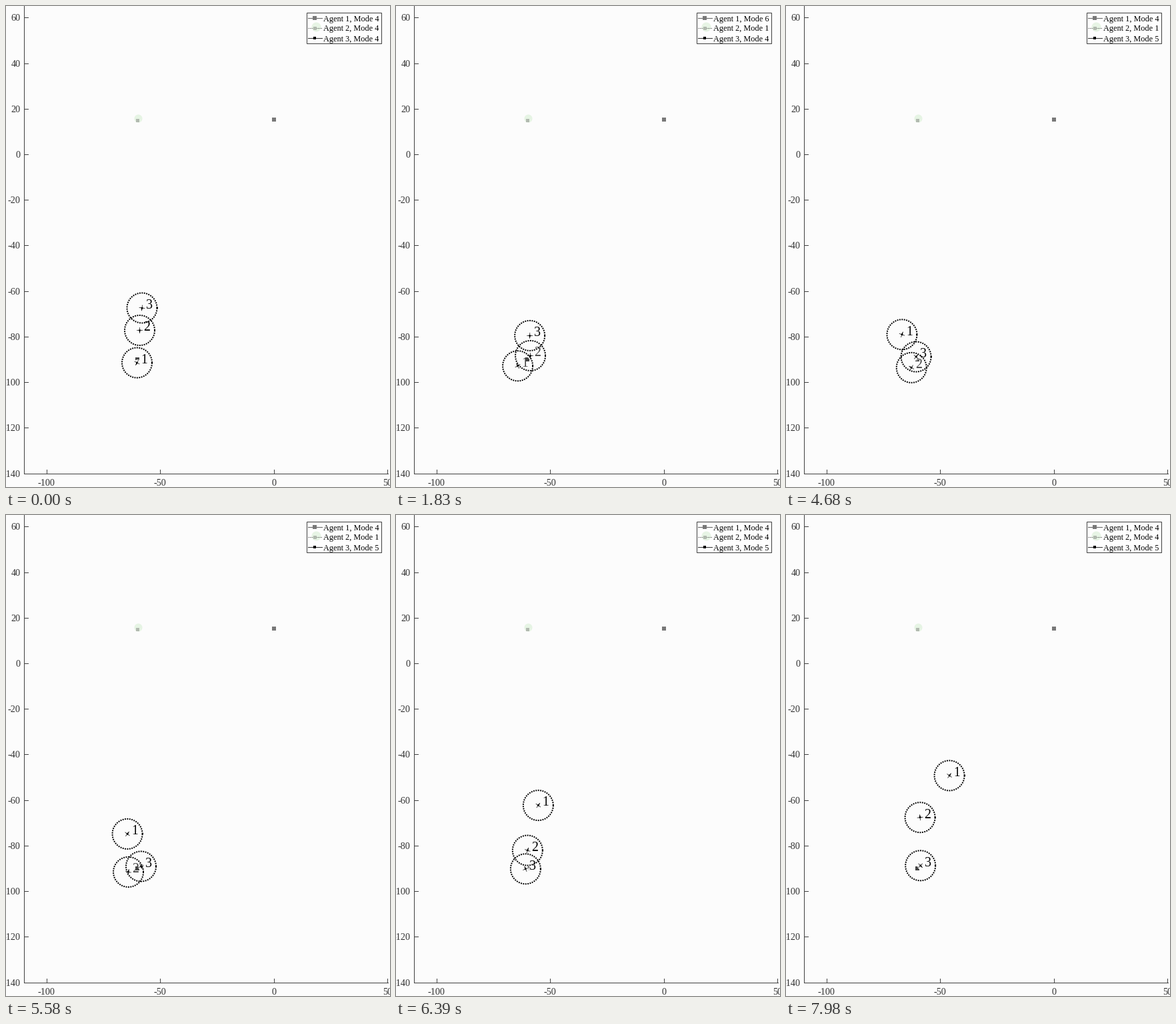
Animation, 576 px wide and 720 px high, one loop 8000 ms. Source, as a matplotlib script:

```python
import numpy as np
import matplotlib.pyplot as plt
from matplotlib.animation import FuncAnimation

W, H = 576, 720
LOOP, STEP = 8000, 20
SLOW, CUT = 2520, 5730      # slow stretch, then a hard jump in the flight
PAPER, DIM, INK, RULE = "#fcfcfc", "#f1f1f1", "#333333", "#404040"
RADIUS = 22.5

plt.rcParams["font.family"] = "Liberation Serif"


def hold(t):
    """Time of the pose on show: 60 ms steps, 180 ms in the slow stretch."""
    if t >= CUT:
        return max(CUT, t - t % 60)
    start, gap = (SLOW, 180) if t >= SLOW else (30, 60)
    return max(0, t - (t - start) % gap)


def curve(t, start, end, *points):
    """Point on the Bezier curve flown from start to end."""
    u = (t - start) / (end - start)
    pts = np.array(points, float)
    while len(pts) > 1:
        pts = pts[:-1] + (pts[1:] - pts[:-1]) * u
    return pts[0]


def orbit(degrees):
    a = np.radians(degrees)
    return np.array([198.5 + 4.5 * np.cos(a), 528 + 4.5 * np.sin(a)])


def first(t):
    if t < SLOW:
        return curve(t, 0, SLOW, (196.5, 534), (184.5, 556), (178.5, 525))
    if t < CUT:
        return curve(t, SLOW, CUT, (178.5, 525), (162.5, 501), (184, 475))
    return curve(t, CUT, LOOP, (201, 452), (245.5, 389.5))


def second(t):
    if t < SLOW:
        return curve(t, 0, SLOW, (200.5, 485.5), (202, 539.5))
    if t < CUT:
        return curve(t, SLOW, CUT, (202, 539.5), (211, 550), (179, 543), (184, 533))
    return curve(t, CUT, LOOP, (190.5, 516), (205.5, 493.5), (201, 452))


def third(t):
    if t < 3240:
        return curve(t, 0, 3240, (204, 452), (198.5, 488), (202, 531))
    if t < CUT:
        return orbit(41 + (t - 3240) / 8)
    return orbit(-45 + (t - CUT) * 0.32)


def modes(t):
    return (6 if 1200 <= t < 2700 else 4,
            1 if 1500 <= t < 6180 else 4,
            4 if t < 2700 else 5)


fig = plt.figure(figsize=(W / 72, H / 72), dpi=72, facecolor=PAPER)
ax = fig.add_axes([0, 0, 1, 1])
ax.set_xlim(0, W)
ax.set_ylim(H, 0)
ax.axis("off")


def line(xs, ys, color=RULE, lw=1, **kw):
    return ax.plot(xs, ys, color=color, lw=lw, **kw)[0]


def dot(x, y, marker, size, color, z=3):
    return line([x], [y], color, marker=marker, ms=size, mew=0, ls="", zorder=z)


def draw_axes():
    line([26.5, 26.5], [0, 699.5])
    line([26.5, 572.5], [699.5, 699.5])
    for v in range(-140, 61, 20):
        y = 222 - 3.411 * v
        line([26.5, 33], [y, y])
        ax.text(21.5, y + 5, str(v), size=14.2, color=INK, ha="right")
    for v in range(-100, 51, 50):
        x = 401.7 + 3.408 * v
        line([x, x], [694, 699.5])
        ax.text(x, 717.5, str(v), size=14.2, color=INK, ha="center")


def draw_legend():
    ax.add_patch(plt.Rectangle((450.5, 9.5), 112, 46, fc="#fefefe",
                               ec=RULE, lw=1, zorder=1))
    dot(465, 31, "o", 14, "#e7f4e5", 2)
    styles = [("#606060", "-", "#787878", 6),
              ("#505050", (0, (1.2, 1.2)), "#b2bab0", 5),
              ("#333333", "-", "black", 4.8)]
    rows = []
    for i, (color, ls, fill, size) in enumerate(styles):
        y = 18 + 15 * i
        line([453, 474], [y, y], color, ls=ls)
        dot(463, y - 0.4, "s", size, fill)
        rows.append(ax.text(476.3, y + 4.5, "", size=12.3, color="black"))
    return rows


draw_axes()
rows = draw_legend()

# Goals
halo = dot(198, 168, "o", 12, "#e6f4e4", 2)
dot(196.5, 170.5, "s", 5, "#b2bab0")
dot(402, 170.3, "s", 6, "#787878")
dot(196.5, 528.5, "s", 5.5, "#444444")

angle = np.linspace(0, 2 * np.pi, 120)
RING = RADIUS * np.array([np.cos(angle), np.sin(angle)])
NOSE = np.array([(4, 0), (-1, 1.7), (-1, -1.7)])
ARMS = np.array([(-4, 0), (4, 0), (np.nan, np.nan), (0, -4), (0, 4)])


class Agent:
    def __init__(self, name, path):
        self.path = path
        self.body = dot(0, 0, "o", 10.5, PAPER, 4)
        self.ring = line([], [], "black", 2, ls=(0, (0.95, 0.75)),
                         dash_capstyle="butt", zorder=5)
        self.seam = dot(0, 0, "s", 2.4, "black", 5)
        self.arms = line([], [], "#222222", 0.8, zorder=6)
        self.nose = ax.add_patch(plt.Polygon(NOSE, fc="black", lw=0, zorder=6))
        self.label = ax.text(0, 0, name, size=20, zorder=7)

    def show(self, t, paper, color):
        x, y = pos = self.path(t)
        dx, dy = self.path(t + 1) - pos
        c, s = np.array([dx, dy]) / np.hypot(dx, dy)
        turn = np.array([(c, s), (-s, c)])
        self.body.set_data([x], [y])
        self.body.set_color(paper)
        self.ring.set_data(RING[0] + x, RING[1] + y)
        self.seam.set_data([x + RADIUS], [y])
        self.arms.set_data(*(ARMS @ turn + pos).T)
        self.nose.set_xy(NOSE @ turn + pos)
        self.label.set_position((x + 6, y + 0.8))
        self.label.set_color(color)


agents = [Agent(str(i + 1), path) for i, path in enumerate((first, second, third))]


def update(frame):
    now = frame * STEP
    t = hold(now)
    flash = CUT <= now < CUT + 70
    paper = DIM if flash else PAPER
    fig.set_facecolor(paper)
    halo.set_data([200 if flash else 198], [165.5 if flash else 168])
    halo.set_markersize(14 if flash else 12)
    for i, (agent, mode) in enumerate(zip(agents, modes(t))):
        rows[i].set_text(f"Agent {i + 1}, Mode {mode}")
        agent.show(t, paper, "#444444" if mode in (1, 6) else "black")
    return []


anim = FuncAnimation(fig, update, frames=LOOP // STEP, interval=STEP,
                     init_func=lambda: update(0), repeat=True, repeat_delay=0)
plt.show()
```
